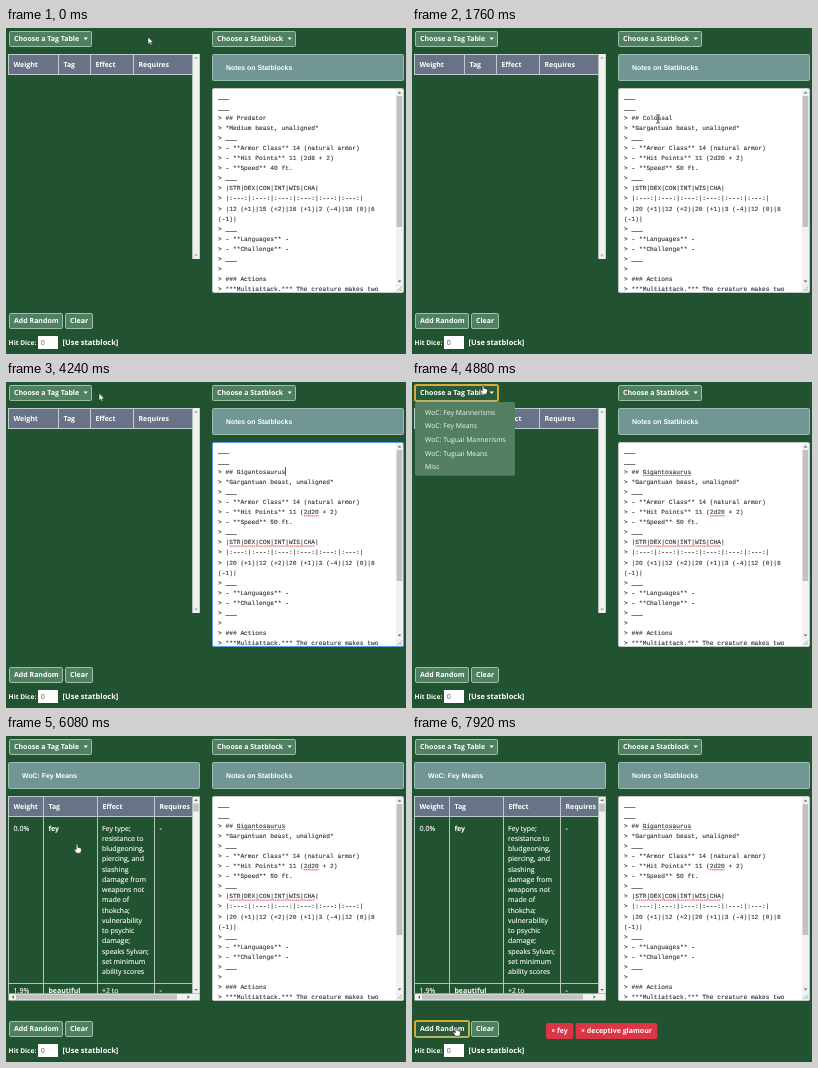
Write an HTML page that moves like this. It is 400x326 px and loops after 8000 ms.

```html
<!DOCTYPE html>
<html lang="en">
<head>
<meta charset="utf-8">
<title>Statblock tagger</title>
<style>
  html, body { margin: 0; width: 100%; height: 100%; overflow: hidden; background: #225331; }
  svg { display: block; width: 400px; height: 326px; }
  text { white-space: pre; text-rendering: geometricPrecision; font: 7px "Open Sans", sans-serif; fill: #fff; }
  .b { font-weight: 700; }
  .cell { stroke: #fff; stroke-width: .12; }
  .title { font: 700 6.9px "Liberation Sans", Arial, sans-serif; fill: #fff; }
  .item { font-size: 6.85px; fill: #f0f5f1; }
  .code { font: 6.22px "Liberation Mono", monospace; fill: #2c3136; stroke: #2c3136; stroke-width: .1; }
</style>
</head>
<body>
<svg id="stage" viewBox="0 0 400 326"></svg>
<script>
const LOOP = 8000, STEP = 80;
const stage = document.getElementById('stage');

function el(tag, attrs, parent = stage) {
  const node = document.createElementNS('http://www.w3.org/2000/svg', tag);
  for (const k in attrs) node.setAttribute(k, attrs[k]);
  parent.appendChild(node);
  return node;
}
const group = (parent, attrs = {}) => el('g', attrs, parent);
const rect = (p, x, y, width, height, fill, more = {}) =>
  el('rect', { x, y, width, height, fill, ...more }, p);
const path = (p, d, fill, more = {}) => el('path', { d, fill, ...more }, p);
function text(p, x, y, str, cls = '') {
  const node = el('text', { x, y, class: cls }, p);
  node.textContent = str;
  return node;
}
const show = (node, on) => node.setAttribute('visibility', on ? 'visible' : 'hidden');
function clip(id, x, y, w, h) {
  rect(el('clipPath', { id }), x, y, w, h, '#000');
  return { 'clip-path': `url(#${id})` };
}

// ---- widgets ----
function button(x, y, w, label, drop) {
  const box = rect(stage, x + .5, y + .5, w - 1, 15, '#4f8061', { rx: 1.2, stroke: '#9dc2a8' });
  text(stage, x + 5, y + 10.3, label, 'b');
  if (drop) path(stage, `M${x + w - 8.5} ${y + 6.6}h4.4l-2.2 2.4z`, '#fff');
  const ring = rect(stage, x - .2, y - .2, w + .4, 16.4, 'none', { rx: 2, stroke: '#d8a92f', 'stroke-width': 1.6 });
  show(ring, false);
  return { box, ring };
}
function press(btn, on) {
  show(btn.ring, on);
  btn.box.setAttribute('fill', on ? '#2a5b38' : '#4f8061');
}
function banner(p, x, w, label, dx) {
  rect(p, x + .5, 26.5, w - 1, 26, '#729694', { rx: 1.2, stroke: '#9dbdb9' });
  text(p, x + dx, 41.5, label, 'title');
}
function menu(x, w, items) {
  const g = group(stage);
  rect(g, x, 20, w, 5.5 + items.length * 13.65, '#557f62', { rx: 2 });
  items.forEach((s, i) => text(g, x + 10, 32.8 + i * 13.65, s, 'item'));
  return g;
}
function scrollbar(p, x, y, h, thumb) {
  rect(p, x, y, 7.5, h, '#f0f1f1');
  if (thumb) rect(p, x + 1, y + 7, 5.5, thumb, '#bfc1c2');
  const ink = thumb ? '#686b6d' : '#a3a6a8';
  path(p, `M${x + 1.9} ${y + 4.6}h3.8l-1.9-2.2z`, ink);
  path(p, `M${x + 1.9} ${y + h - 4.6}h3.8l-1.9 2.2z`, ink);
}
function header(p, y, h, cols, labels) {
  rect(p, 2.5, y, 183.5, h, '#687387');
  path(p, `M2 ${y + .5}H186M2 ${y + h - .5}H186` + cols.map(x => `M${x} ${y}v${h}`).join(''),
    'none', { stroke: '#c3c9d2' });
  labels.forEach((s, i) => text(p, cols[i] + 4.9, y + h / 2 + 2.4, s, 'b'));
}

// ---- left column: tag tables ----
const LABELS = ['Weight', 'Tag', 'Effect', 'Requires'];
const emptyTable = group(stage);
header(emptyTable, 26, 21, [2.5, 52.5, 84.5, 127.5], LABELS);
scrollbar(emptyTable, 186.3, 26, 205);

const tagTable = group(stage);
banner(tagTable, 2, 192, 'WoC: Fey Means', 14);
const rows = group(tagTable, clip('rows', 2, 60, 184, 197.5));
const COLS = [2.5, 37.5, 91.5, 148.5];
header(rows, 60, 21, COLS, LABELS);
path(rows, 'M2 247.5H186' + COLS.map(x => `M${x} 81V258`).join(''), 'none', { stroke: '#b4c4b9' });
function row(y, weight, tag, effect) {
  text(rows, 7.6, y, weight, 'cell');
  text(rows, 42.4, y, tag, 'b');
  effect.forEach((s, i) => text(rows, 96, y + i * 10.25, s, 'cell'));
  text(rows, 153.6, y, '-', 'cell');
}
row(94.6, '0.0%', 'fey', ['Fey type;', 'resistance to', 'bludgeoning,', 'piercing, and', 'slashing',
  'damage from', 'weapons not', 'made of', 'thokcha;', 'vulnerability', 'to psychic', 'damage;',
  'speaks Sylvan;', 'set minimum', 'ability scores']);
row(256.6, '1.9%', 'beautiful', ['+2 to']);
scrollbar(tagTable, 186.3, 60.5, 197, 8);
rect(tagTable, 2.5, 257.5, 191.3, 7, '#f0f1f1');
rect(tagTable, 10, 258.5, 161, 5, '#bfc1c2');
path(tagTable, 'M8 259.2v3.8l-2.2-1.9zM181.5 259.2v3.8l2.2-1.9z', '#686b6d');

// ---- right column: statblock ----
banner(stage, 206, 192, 'Notes on Statblocks', 14);
const area = rect(stage, 206.5, 60.5, 191, 204, '#fff', { rx: 1.5 });
const code = group(stage, clip('code', 207, 61, 183, 203));
const CODE_X = 212, CH = 3.733;
const lineY = i => 71.4 + i * 10.1;
const colX = n => CODE_X + n * CH;
const picked = rect(code, colX(5), 85, CH * 8, 9, '#3b8eea');

const statblock = (kind, ac, hp, speed, stats) => ['___', '___', '', `> *${kind} beast, unaligned*`, '> ___',
  `> - **Armor Class** ${ac}`, `> - **Hit Points** 11 (${hp} + 2)`, `> - **Speed** ${speed} ft.`, '> ___',
  '> |STR|DEX|CON|INT|WIS|CHA|', '> |:---:|:---:|:---:|:---:|:---:|:---:|', `> |${stats}`, '(-1)|', '> ___',
  '> - **Languages** -', '> - **Challenge** -', '> ___', '>', '> ### Actions',
  '> ***Multiattack.*** The creature makes two'];
const ARMOR = '14 (natural armor)';
const predator = statblock('Medium', ARMOR, '2d8', 40, '12 (+1)|15 (+2)|16 (+1)|2 (-4)|10 (0)|6');
const colossal = statblock('Gargantuan', ARMOR, '2d20', 50, '20 (+1)|12 (+2)|20 (+1)|3 (-4)|12 (0)|8');
const lines = predator.map((s, i) => text(code, CODE_X, lineY(i), s, 'code'));
const name = text(code, colX(5), lineY(2), '', 'code');
const caret = rect(code, 0, 85, .7, 8.8, '#222');

function squiggle(line, from, to) {
  return path(code, `M${colX(from)} ${lineY(line) + 1.8}H${colX(to)}`, 'none',
    { stroke: '#e0393e', 'stroke-width': .9, 'stroke-dasharray': '1.4 .5' });
}
const typos = [squiggle(6, 23, 27), squiggle(9, 3, 26)];
const nameTypo = squiggle(2, 5, 18);
scrollbar(stage, 389.7, 61, 196, 131);
rect(stage, 389.7, 257, 7.3, 7, '#f0f1f1');
path(stage, 'M391.5 263l4.5-4.5M394 263l2-2', 'none', { stroke: '#8b8e90', 'stroke-width': .7 });
const frame = rect(stage, 206.5, 60.5, 191, 204, 'none', { rx: 1.5 });

// ---- bottom bar ----
const addBtn = button(3, 285, 54, 'Add Random');
button(59, 285, 28, 'Clear');
text(stage, 2.6, 316.8, 'Hit Dice:', 'b').style.fontSize = '6.6px';
rect(stage, 32, 308, 20, 13, '#fff');
text(stage, 34.8, 317, '0').style.fill = '#555';
text(stage, 56.6, 316.8, '[Use statblock]', 'b').style.fontSize = '7.5px';

function badge(x, w, label) {
  const g = group(stage);
  rect(g, x, 287, w, 16, '#dc3545', { rx: 2 });
  text(g, x + 5.3, 297.4, '× ' + label, 'b');
  return g;
}
const fey = badge(134, 27.3, 'fey');
const glamour = badge(163.7, 81.6, 'deceptive glamour');

// ---- top buttons and menus ----
const tagBtn = button(3, 3, 83, 'Choose a Tag Table', true);
const statBtn = button(206, 3, 84, 'Choose a Statblock', true);
const tagMenu = menu(3, 100, ['WoC: Fey Mannerisms', 'WoC: Fey Means', 'WoC: Tuguai Mannerisms', 'WoC: Tuguai Means', 'Misc']);
const statMenu = menu(206, 83, ['Predator', 'Colossal', 'Minion']);

// ---- pointer ----
const pointer = group(stage);
const shapes = {
  arrow: path(pointer, 'M0 0V7.2L1.7 5.7 2.9 8.3 4 7.8 2.9 5.3H5.2z', '#fff', { stroke: '#222', 'stroke-width': .5 }),
  beam: path(pointer, 'M-1.8-4H-.4L0-3.6.4-4H1.8M0-3.6V3.6M-1.8 4H-.4L0 3.6.4 4H1.8', 'none', { stroke: '#222', 'stroke-width': .9 }),
  hand: path(pointer, 'M-.8 .6Q0-.6.8.6V3.2L4 4.2Q4.8 4.6 4.4 6.2L3.6 9.2H-.6L-3 5.6Q-2.6 4.6-1.6 5.2L-.8 6z', '#fff', { stroke: '#222', 'stroke-width': .6 })
};
// time, x, y, shape from then on
const TRACK = [
  [0, 142, 9, 'arrow'], [400, 262, 9, 'hand'], [560, 260, 12, 'hand'], [880, 236, 41, 'hand'],
  [1200, 234, 42, 'hand'], [1360, 240, 68, 'beam'], [1760, 246, 91, 'beam'], [2000, 244, 90, 'beam'],
  [2240, 262, 91, 'beam'], [2640, 386, 90, 'beam'], [2960, 383, 87, 'beam'], [3600, 383, 88, 'beam'],
  [3760, 350, 68, 'arrow'], [4320, 78, 8, 'hand'], [4480, 70, 5, 'hand'], [4880, 71, 3, 'hand'],
  [5360, 50, 41, 'hand'], [5520, 50, 42, 'hand'], [6080, 71, 108, 'hand'], [6320, 46, 90, 'hand'],
  [6480, 47, 91, 'hand'], [6800, 90, 163, 'hand'], [6880, 160, 240, 'arrow'], [6960, 246, 291, 'hand'],
  [7040, 14, 290, 'hand'], [7200, 38, 292, 'hand'], [7920, 44, 291, 'hand'], [8000, 44, 291, 'hand']
];
function movePointer(t) {
  const i = TRACK.findIndex((k, n) => n + 1 === TRACK.length - 1 || t < TRACK[n + 1][0]);
  const [t0, x0, y0, kind] = TRACK[i], [t1, x1, y1] = TRACK[i + 1];
  const u = (t - t0) / (t1 - t0), e = u * u * (3 - 2 * u);
  pointer.setAttribute('transform', `translate(${x0 + (x1 - x0) * e} ${y0 + (y1 - y0) * e})`);
  for (const k in shapes) show(shapes[k], k === kind);
}

const TYPED = 'Gigantosaurus';
function typedCount(t) {
  if (t < 2800) return 0;
  return t < 2960 ? 1 : Math.min(TYPED.length, 2 + Math.floor((t - 2960) / 50));
}

let block;
function render(t) {
  const within = (a, b) => t >= a && t < b;
  const typed = typedCount(t), focus = within(2000, 4480), chosen = t >= 1200;
  const next = chosen ? colossal : predator;
  if (next !== block) {
    block = next;
    lines.forEach((n, i) => { n.textContent = i === 2 ? '> ##' : block[i]; });
  }
  const heading = typed ? TYPED.slice(0, typed) : chosen ? 'Colossal' : 'Predator';
  const selected = within(2080, 2800);
  name.textContent = heading;
  name.style.fill = name.style.stroke = selected ? '#fff' : '';
  show(picked, selected);
  show(caret, focus && !selected);
  caret.setAttribute('x', colX(5 + heading.length));
  frame.setAttribute('stroke', focus ? '#5b9fe0' : '#c3cbc6');
  typos.forEach(n => show(n, t >= 2800));
  show(nameTypo, t >= 4480);

  press(statBtn, within(480, 1200));
  show(statMenu, within(560, 1200));
  press(tagBtn, within(4480, 5520));
  show(tagMenu, within(4560, 5520));
  show(emptyTable, t < 5520);
  show(tagTable, t >= 5520);
  show(fey, t >= 6400);
  press(addBtn, t >= 7200);
  show(glamour, t >= 7280);
  movePointer(t);
}

const start = performance.now();
function tick(now) {
  const t = Math.max(0, now - start) % LOOP;
  render(Math.floor(t / STEP) * STEP);
  requestAnimationFrame(tick);
}
render(0);
requestAnimationFrame(tick);
</script>
</body>
</html>
```
